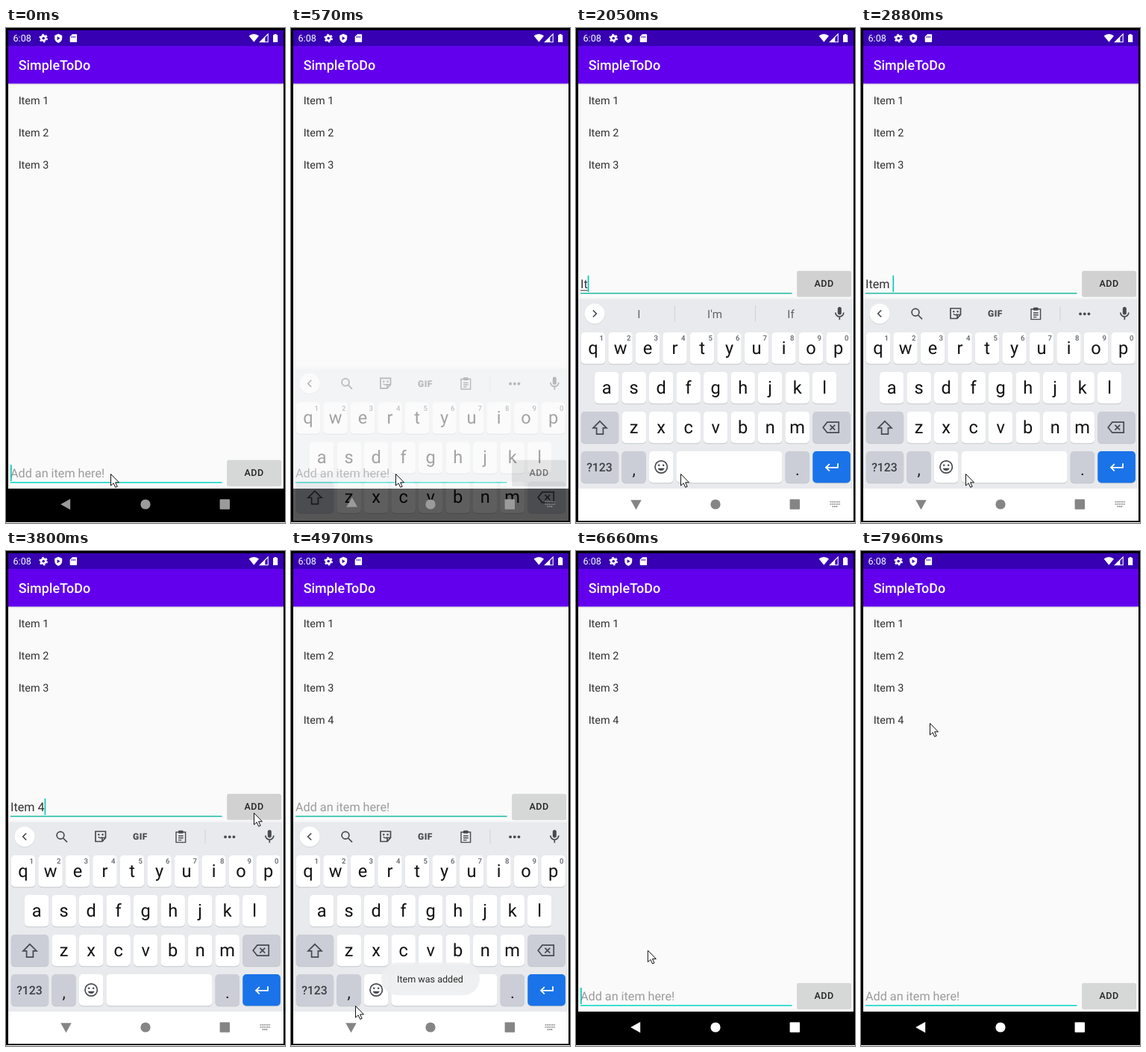
An HTML page that plays this animation: 374x662 px, repeating every 8000 ms.

```html
<!DOCTYPE html>
<html lang="en">
<head>
<meta charset="utf-8">
<title>To-do list</title>
<style>
  html, body { margin: 0; width: 100%; height: 100%; overflow: hidden; background: #000; }
  svg { display: block; width: 100vw; height: 100vh; font-family: Roboto, sans-serif; text-rendering: geometricPrecision; }
  .line { fill: none; stroke: #474a4f; stroke-width: 1.7; }
  .thin { stroke-width: 1.4; }
  .dot { stroke-width: 2.4; stroke-linecap: round; }
  .big { stroke-width: 3.8; }
</style>
</head>
<body>
<svg viewBox="0 0 374 662">
  <defs>
    <clipPath id="screen"><rect x="3" y="3" width="369" height="656"/></clipPath>
    <clipPath id="navArea"><rect x="3" y="616" width="369" height="43"/></clipPath>
    <linearGradient id="shade" x2="0" y2="1">
      <stop stop-color="#000" stop-opacity=".12"/><stop offset="1" stop-color="#000" stop-opacity="0"/>
    </linearGradient>
  </defs>
  <rect width="374" height="662"/>
  <rect y="661" width="374" height="1" fill="#fff"/>

  <g clip-path="url(#screen)">
    <rect x="3" y="74" width="369" height="542" fill="#fafafa"/>
    <rect x="3" y="3" width="369" height="21" fill="#3700b3"/>
    <rect x="3" y="24" width="369" height="50.4" fill="#6200ee"/>
    <rect x="3" y="74.4" width="369" height="2.6" fill="url(#shade)"/>

    <g fill="#fff">
      <text x="9.5" y="18.3" font-size="12.6">6:08</text>
      <circle cx="50.2" cy="13.7" r="3.1" fill="none" stroke="#fff" stroke-width="2.6"/>
      <circle cx="50.2" cy="13.7" r="5" fill="none" stroke="#fff" stroke-width="1.6" stroke-dasharray="2.6 2.636"/>
      <path d="M70.2 7.8l5 2.2v3.8c0 2.9-2 5.2-5 6.2-3-1-5-3.3-5-6.2V10z"/>
      <path d="M68.6 11.2v5l4-2.5z" fill="#3700b3"/>
      <path d="M89 8.2h5.2q.9 0 .9.9v9q0 .9-.9.9h-7.6q-.9 0-.9-.9v-6.6z"/>
      <path d="M88.2 10.8v2.4m2.1-2.4v2.4m2.1-2.4v2.4" stroke="#3700b3"/>
      <path d="M325.6 10.6a10 10 0 0 1 13.4 0l-6.7 8.2z"/>
      <path d="M351.2 8v10.8h-10.8z" fill="none" stroke="#fff" stroke-width="1.1"/>
      <path d="M347.4 11.6v7.4h-7.4z"/>
      <path d="M358 9.3h1.7V8h2.8v1.3h1.7v9.8H358z"/>
    </g>
    <text x="16.7" y="56" font-size="17.96" font-weight="500" fill="#fff">SimpleToDo</text>
    <g id="list" font-size="14.4" fill="#303030"></g>

    <g id="entry">
      <text id="hint" x="6" y="601" font-size="16.2" fill="#9b9b9b">Add an item here!</text>
      <text id="typed" x="6" y="601" font-size="16.2" fill="#303030"></text>
      <path id="compose" stroke="#303030"/>
      <rect id="rule" x="6" y="607" width="283.5" height="1.6"/>
      <rect id="caret" y="584" width="1.6" height="22" fill="#03c5b3"/>
      <rect x="296.2" y="578.4" width="72.8" height="34.4" rx="2" fill="#000" opacity=".16"/>
      <rect id="button" x="296.5" y="577.8" width="72" height="33.4" rx="2"/>
      <text x="332.5" y="599" font-size="12.5" font-weight="500" letter-spacing=".5" text-anchor="middle" fill="#222">ADD</text>
    </g>

    <rect id="navBack" x="3" y="616" width="369" height="43"/>
    <g id="keyboard">
      <rect x="3" y="361" width="369" height="255" fill="#e8eaed"/>
      <rect x="3" y="361" width="369" height="2" fill="#f1f2f4"/>
      <circle cx="25" cy="382.7" r="14" fill="#000" opacity=".08"/>
      <circle cx="25" cy="382" r="13.6" fill="#fff"/>
      <path id="chevron" class="line"/>
      <g id="tools">
        <circle cx="73" cy="380.3" r="4.9" class="line"/>
        <path d="M76.6 384l5.4 5.4" class="line"/>
        <path d="M122 375h11.5v8.5l-4.5 5h-9V375zM133.5 383.5h-4.5v5" class="line"/>
        <path d="M124.2 379.3h.1m5.2 0h.1" class="line dot"/>
        <path d="M123.8 382.2q2.6 2.8 5.2 .5" class="line thin"/>
        <text x="180" y="386.3" font-size="12" font-weight="900" text-anchor="middle" letter-spacing=".5" fill="#474a4f">GIF</text>
        <path d="M228 376h12.6v13.6H228zM231 381h6.6m-6.6 2.8h6.6m-6.6 2.8h4.4" class="line thin"/>
        <rect x="231" y="373.8" width="6.6" height="4" rx="1" fill="#474a4f"/>
        <path d="M267 372.5v19" stroke="#cfd2d6"/>
        <path d="M294 382.3h.1m5.6 0h.1m5.6 0h.1" class="line dot big"/>
      </g>
      <g id="words" font-size="15.2" text-anchor="middle" fill="#5f6368">
        <path d="M132.5 371v22M240.5 371v22" stroke="#cfd2d6"/>
        <text x="84.3" y="387.7"></text><text x="186" y="387.7"></text><text x="288" y="387.7"></text>
      </g>
      <rect x="350.8" y="373" width="5" height="10.5" rx="2.5" fill="#474a4f"/>
      <path d="M347.8 380.5a5.5 5.5 0 0 0 11 0M353.3 386v4.2" class="line"/>
      <g id="keys"></g>
      <path d="M32 525.8l9 9h-4.6v8.4h-8.8v-8.4H23z" class="line"/>
      <path d="M336.8 527.2h15.4v14h-15.4l-5.6-7zM340.4 530.8l6.8 6.8m0-6.8l-6.8 6.8" class="line"/>
      <circle cx="114.2" cy="587" r="8.2" class="line"/>
      <path d="M111.2 584.7h.1m5.8 0h.1" class="line dot"/>
      <path d="M109.8 588.8a4.6 4.6 0 0 0 8.8 0z" fill="#474a4f"/>
      <path d="M351 582.2v5.6h-16m4.8-4.6l-4.8 4.6 4.8 4.6" fill="none" stroke="#fff" stroke-width="1.8"/>
    </g>

    <g id="toast">
      <rect x="121" y="550.5" width="132" height="43.5" rx="21.7" fill="#eeeff0" opacity=".9"/>
      <text x="142" y="577.3" font-size="12.57" fill="#2b2b2b">Item was added</text>
    </g>

    <circle id="ripple" cx="80" cy="637" r="48" fill="#fff" opacity=".07" clip-path="url(#navArea)"/>
    <g id="nav">
      <path id="back" d="M73.2 637l13-7.2v14.4z"/>
      <circle cx="187" cy="637" r="6.6"/>
      <rect x="286.6" y="630.3" width="13.4" height="13.4" rx="1"/>
      <path id="imeIcon" d="M340.5 633.7h13.5m-13.5 3h13.5m-10.5 3.2h7.5" fill="none" stroke="#8a8a8a" stroke-width="1.6" stroke-dasharray="1.7 .7"/>
    </g>
  </g>
  <path id="mouse" d="M.5.5V16l3.6-3.3 2.6 5.6 2.5-1.1-2.6-5.4h4.9z" fill="#fff" stroke="#111"/>
</svg>
<script>
const LOOP = 8000;
const $ = id => document.getElementById(id);
const set = (id, attrs) => { for (const k in attrs) $(id).setAttribute(k, attrs[k]); };
const show = (id, on) => set(id, { visibility: on ? 'visible' : 'hidden' });
const label = (x, y, size, s, color, extra = '') =>
  `<text x="${x}" y="${y}" font-size="${size}" fill="${color}" text-anchor="middle" ${extra}>${s}</text>`;

// Static parts
$('list').innerHTML = [1, 2, 3, 4].map(n =>
  `<text id="item${n}" x="16.7" y="${58.7 + 43 * n}">Item ${n}</text>`).join('');

const PITCH = 36.5, GREY = '#cbced6';
const key = (x, y, w, fill = '#fff') =>
  `<rect x="${x}" y="${y + 1}" width="${w}" height="42.3" rx="5" fill="#c3c6cb"/>` +
  `<rect x="${x}" y="${y}" width="${w}" height="42.3" rx="5" fill="${fill}"/>`;

function letterRow(chars, x0, y, digits) {
  return [...chars].map((c, i) => {
    const x = x0 + i * PITCH;
    return key(x - 16.2, y, 32.4) + label(x, y + 28.5, 23.6, c, '#111') +
      (digits ? label(x + 11.3, y + 11.2, 9.6, (i + 1) % 10, '#5f6368', 'font-weight="500"') : '');
  }).join('');
}

$('keys').innerHTML =
  letterRow('qwertyuiop', 23, 407, true) +
  letterRow('asdfghjkl', 41.2, 460) +
  letterRow('zxcvbnm', 77.7, 513) +
  key(6.8, 513, 50.4, GREY) + key(317.3, 513, 50.6, GREY) +
  key(6.8, 566, 50.4, GREY) + key(61.3, 566, 32.4, GREY) + key(98, 566, 32.4) +
  key(134.4, 566, 142) + key(280.6, 566, 32.4, GREY) + key(317.3, 566, 50.6, '#1a73e8') +
  label(31.5, 593, 15.8, '?123', '#3c4043', 'font-weight="500"') +
  label(77.6, 598, 22, ',', '#222') + label(296.8, 598, 22, '.', '#222');

// Timing helpers
const ramp = (t, a, b) => Math.min(1, Math.max(0, (t - a) / (b - a)));
const ease = u => u * u * (3 - 2 * u);
const hold = (t, start, step) => start + Math.floor((t - start) / step) * step;
const blink = t => Math.floor(t / 505) % 2 === 0;

const TYPE_AT = 1770, TYPED_AT = 3000, ADD_AT = 4070, OPEN_AT = 570, CLOSE_AT = 5750;
const ENTRY = 'Item 4';
const KEY_GAP = (TYPED_AT - TYPE_AT) / (ENTRY.length - 1);
const ADVANCE = { I: .272, t: .327, e: .53, m: .876, ' ': .248, 4: .562 };
const widthOf = s => [...s].reduce((w, c) => w + ADVANCE[c] * 16.2, 0);

function typedText(t) {
  if (t < TYPE_AT || t >= ADD_AT) return '';
  return ENTRY.slice(0, 1 + Math.floor((t - TYPE_AT) / KEY_GAP + 1e-6));
}

function suggestions(t, text) {
  if (t >= CLOSE_AT) return ['', '', ''];
  return { It: ['I', "I'm", 'If'], Ite: ['It', "It's", 'Its'], Item: ['Item', 'Items', 'Itemized'] }[text];
}

function caretOn(t) {
  if (t < TYPE_AT) return blink(t + 85);
  if (t < TYPED_AT) return true;
  return blink(t - (t < ADD_AT ? 2780 : 4175));
}

// Each move is a quadratic curve: from, bend, to
const linear = u => u;
const MOVES = [
  { start: 3130, end: 3790, curve: ease, x: [140, 236, 332], y: [596, 473, 350] },
  { start: 4560, end: 4970, curve: linear, x: [332, 60, 86], y: [350, 440, 608] },
  { start: 4970, end: 5240, curve: linear, x: [86, 86, 78], y: [608, 640, 640] },
  { start: 6140, end: 7700, curve: ease, x: [78, 122, 92], y: [640, 435, 230] }
];

function mousePos(t) {
  const m = MOVES.filter(v => v.start <= t).pop() || MOVES[0];
  const u = t >= m.end ? 1 : m.curve(ramp(hold(t, m.start, 130), m.start, m.end));
  const bend = ([a, b, c]) => (1 - u) ** 2 * a + 2 * u * (1 - u) * b + u * u * c;
  return [bend(m.x), bend(m.y)];
}

function render(t) {
  const raised = t >= OPEN_AT + 120 && t < CLOSE_AT;
  const text = typedText(t);
  const end = 6 + widthOf(text);

  set('entry', { transform: `translate(0 ${raised ? -253 : 0})` });
  show('hint', !text);
  $('typed').textContent = text;
  set('compose', { d: text && !text.includes(' ') ? `M6 604H${end}` : '' });
  set('rule', { fill: raised ? '#2cbfa9' : '#12d8c6' });
  set('caret', { x: end });
  show('caret', caretOn(t));
  set('button', { fill: t >= 3920 && t < 4310 ? '#c3c4c4' : raised && t < 4550 ? '#d1d1d1' : '#d6d7d7' });
  show('item4', t >= ADD_AT);

  const closing = t >= CLOSE_AT;
  const q = hold(t, closing ? CLOSE_AT : OPEN_AT, 120);
  const open = closing ? 1 - ramp(q, 5700, 5960) : ramp(q, 500, 690);
  const turn = closing ? 1 - ramp(q, 5700, 5925) : ramp(q, 500, 710);
  set('keyboard', { transform: `translate(0 ${148 * (1 - open)})`, opacity: open });

  const words = suggestions(t, text);
  show('tools', !words);
  show('words', words && !closing);
  if (words) $('words').querySelectorAll('text').forEach((e, i) => { e.textContent = words[i]; });
  set('chevron', { d: words ? 'M22.8 377.5l4.5 4.5-4.5 4.5' : 'M27.2 377.5l-4.5 4.5 4.5 4.5' });

  set('toast', { opacity: ramp(t, ADD_AT, 4310) - ramp(t, 6270, 6660) });
  set('navBack', { fill: raised ? '#fff' : '#000' });
  set('nav', { fill: raised ? '#858585' : closing ? '#fff' : '#9b9b9b' });
  set('back', { transform: `rotate(${-90 * turn} 80.5 637)` });
  show('ripple', closing && open > 0);
  show('imeIcon', t >= 420 && !closing);
  set('mouse', { transform: `translate(${mousePos(t)})` });
}

function loop(now) {
  render(now % LOOP);
  requestAnimationFrame(loop);
}
render(0);
requestAnimationFrame(loop);
</script>
</body>
</html>
```
